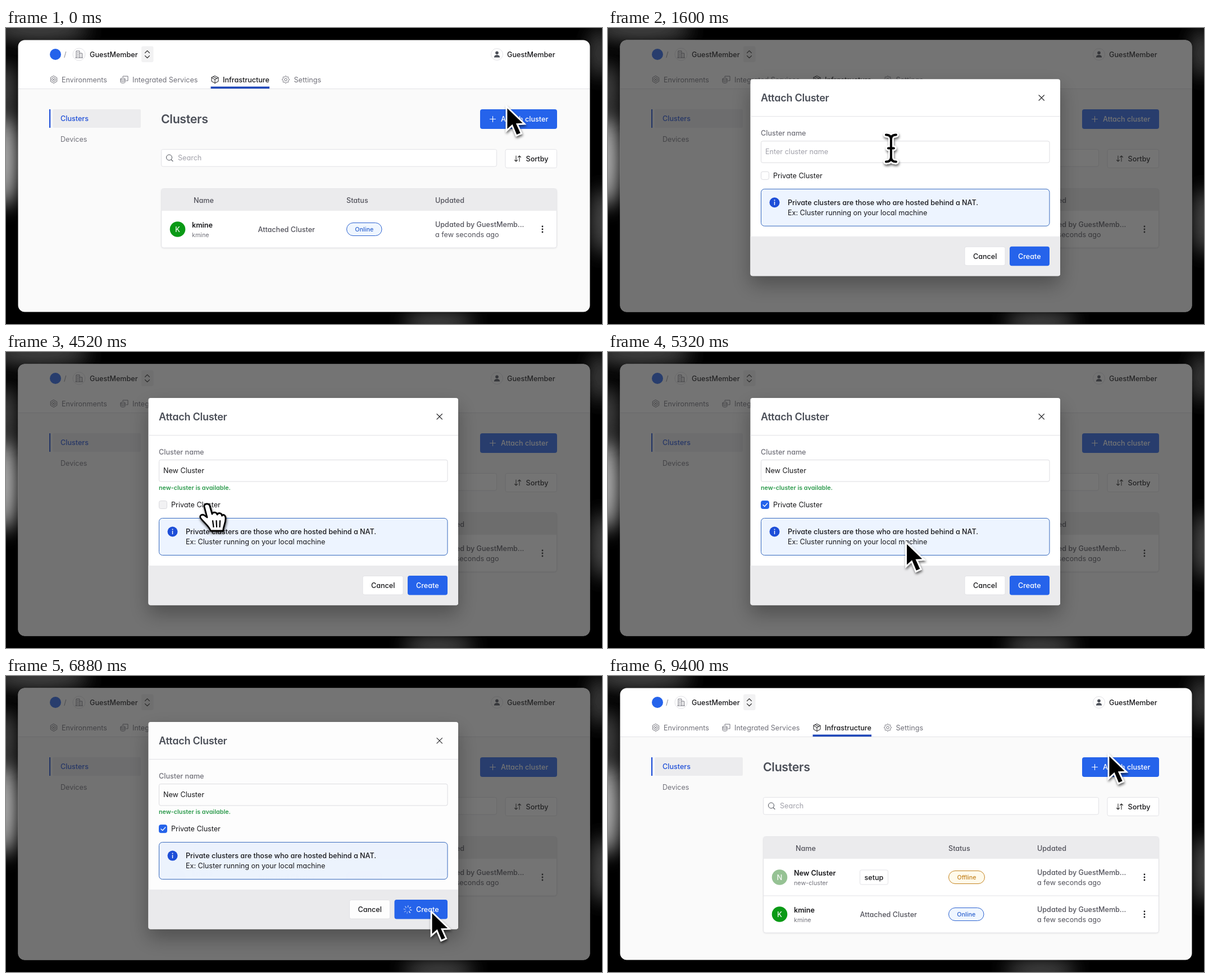
An HTML page that plays this animation: 1061x528 px, repeating every 9.44 s.

```html
<!DOCTYPE html>
<html lang="en">
<head>
<meta charset="utf-8">
<title>Attach cluster</title>
<style>
html, body { margin: 0; width: 100%; height: 100%; overflow: hidden; background: #000; }
svg { display: block; width: 1061px; height: 528px; }
text { font-family: Inter, "Noto Sans", sans-serif; font-feature-settings: "cv11"; font-optical-sizing: none; white-space: pre; }
</style>
</head>
<body>
<svg id="stage" viewBox="0 0 1061 528"></svg>
<script>
const LOOP = 9440;
const BLUE = '#2563eb', DEEP = '#1d4ed8', INK = '#18181b', GREY = '#52525b', SOFT = '#71717a', LINE = '#e2e2e6';
const ACCOUNT = 'GuestMember';

// Markup helpers; text is placed by its vertical centre.
const text = (x, cy, str, { size = 12.6, weight = 400, fill = INK, extra = '' } = {}) =>
  `<text x="${x}" y="${cy + size * 0.36}" font-size="${size}" font-weight="${weight}" fill="${fill}" ${extra}>${str}</text>`;
const rect = (x, y, w, h, r, fill, stroke = 'none', extra = '') =>
  `<rect x="${x}" y="${y}" width="${w}" height="${h}" rx="${r}" fill="${fill}" stroke="${stroke}" ${extra}/>`;
const circle = (x, y, r, fill, stroke = 'none', extra = '') =>
  `<circle cx="${x}" cy="${y}" r="${r}" fill="${fill}" stroke="${stroke}" ${extra}/>`;
const line = (d, stroke = INK, width = 1.1, extra = '') =>
  `<path d="${d}" fill="none" stroke="${stroke}" stroke-width="${width}" stroke-linecap="round" stroke-linejoin="round" ${extra}/>`;
const group = (id, body, extra = '') => `<g id="${id}" ${extra}>${body}</g>`;
const at = (x, y, body) => `<g transform="translate(${x} ${y})">${body}</g>`;
const heading = size => ({ size, weight: 600, fill: '#4b4f58', extra: 'letter-spacing="-0.015em"' });

const blob = (x, y, rx, ry, color) =>
  `<ellipse cx="${x}" cy="${y}" rx="${rx}" ry="${ry}" fill="${color}" filter="url(#haze)"/>`;

const hexagon = r => 'M' + [...Array(6)].map((_, i) =>
  `${(r * Math.sin(i * Math.PI / 3)).toFixed(2)} ${(-r * Math.cos(i * Math.PI / 3)).toFixed(2)}`).join('L') + 'Z';

const gear = 'M' + [...Array(48)].map((_, i) => {
  const a = i * Math.PI / 24, r = 5.7 + 0.9 * Math.cos(a * 8);
  return `${(r * Math.cos(a)).toFixed(2)} ${(r * Math.sin(a)).toFixed(2)}`;
}).join('L') + 'Z';

function header() {
  return rect(22, 22, 1017, 100, 12, '#fff') + rect(22, 108, 1017, 14, 0, '#fafafa') + rect(22, 108, 1017, 1, 0, LINE) +
    circle(88, 47, 10, BLUE) + text(103, 47, '/', { fill: '#8a8a92' }) +
    circle(130, 47, 11, '#fff', LINE) +
    line('M125 53V41h6v12M131 45h4.5v8M123.8 53h12.6M127 44h2M127 47h2M127 50h2M133 48v0M133 51v0', SOFT, 1) +
    text(149, 47, ACCOUNT, { weight: 500 }) +
    rect(241, 32.5, 21.5, 28.5, 3, '#f2f2f3') +
    line('M247.5 44.5l4-4 4 4M247.5 49.5l4 4 4-4', '#333') +
    circle(874, 47, 10.5, '#fff', LINE) + circle(874, 44.3, 2.8, '#4b4f58') +
    '<path d="M868.8 52.5a5.2 4.6 0 0 1 10.4 0z" fill="#4b4f58"/>' +
    text(892, 47, ACCOUNT, { weight: 500 }) +
    at(85, 92, line(hexagon(6.5), SOFT, 1) + line(hexagon(3.6), SOFT, 1) + circle(0, 0, 1.2, SOFT)) +
    text(99, 92, 'Environments', { fill: SOFT }) +
    at(210, 92, line('M-6-1v5.5c0 2.2 8 2.2 8 0V-1M-6-1a4 1.7 0 1 0 8 0a4 1.7 0 1 0-8 0M-6 2c0 2 8 2 8 0M-2-4.5V-6h9v8H4', SOFT, 1)) +
    text(225, 92, 'Integrated Services', { fill: SOFT }) +
    at(372, 92, line('M0-6.5L6-3.5V3L0 6.5L-6 3V-3.5ZM-6-3.5L0 0L6-3.5M0 0V6.5M-3-5L3-2', INK, 1)) +
    text(386, 92, 'Infrastructure', { weight: 500 }) +
    rect(364.5, 104.5, 104.5, 3.6, 0, '#1e46b8') +
    at(498, 92, line(gear, SOFT, 1) + circle(0, 0, 2.3, 'none', SOFT)) +
    text(512.5, 92, 'Settings', { fill: SOFT });
}

const badge = (w, label, fill, stroke) =>
  rect(606.5, -11.5, w, 23, 11.5, fill, stroke) +
  text(606.5 + w / 2, 0, label, { size: 10.75, weight: 500, fill: stroke, extra: 'text-anchor="middle"' });

function row({ letter, color, name, slug, kind, status }) {
  return circle(305.5, 0, 13.8, color) +
    text(305.5, 0, letter, { size: 13, weight: 500, fill: '#fff', extra: 'text-anchor="middle" opacity=".9"' }) +
    text(331, -8, name, { weight: 600 }) + text(331, 10, slug, { size: 10.75, fill: SOFT }) +
    kind + status +
    text(764, -9, `Updated by ${ACCOUNT.slice(0, 9)}...`, { weight: 500, fill: GREY }) +
    text(764, 9, 'a few seconds ago', { fill: GREY }) +
    [-5, 0, 5].map(y => circle(955, y, 1.4, INK)).join('');
}

function content() {
  const th = { weight: 500, fill: GREY };
  return rect(77, 145, 2.2, 33, 0, DEEP) + rect(83, 145, 157, 33, 2, '#ececee') +
    text(97, 161.5, 'Clusters', { weight: 500, fill: DEEP }) + text(97, 198, 'Devices', { fill: SOFT }) +
    text(276, 162.5, 'Clusters', heading(21.3)) +
    rect(844, 145, 137, 35, 4, BLUE) + line('M861.5 162.5h10M866.5 157.5v10', '#fff') +
    text(881, 162.5, 'Attach cluster', { weight: 500, fill: '#fff' }) +
    rect(276.5, 216.5, 597, 30.5, 3, '#fff', LINE) +
    circle(290.5, 231, 5, 'none', '#4b4f58') + line('M294.2 234.8l2.8 2.8', '#4b4f58') +
    text(306, 231.5, 'Search', { fill: '#a1a1aa' }) +
    rect(889, 216.5, 91.5, 33, 3, '#fff', LINE) +
    line('M908 228v10M905.5 235.5l2.5 2.5 2.5-2.5M914 238v-10M911.5 230.5l2.5-2.5 2.5 2.5', '#333') +
    text(925.5, 233, 'Sortby', { weight: 500 }) +
    rect(276.5, 286.5, 704, 105.5, 4, '#fff', LINE, 'id="table" filter="url(#lift)"') +
    '<path d="M276.5 326V290.5a4 4 0 0 1 4-4H976.5a4 4 0 0 1 4 4V326z" fill="#ebebed"/>' +
    text(334, 307, 'Name', th) + text(606, 307, 'Status', th) + text(764, 307, 'Updated', th) +
    group('newRow', at(0, 359, row({
      letter: 'N', color: '#96c294', name: 'New Cluster', slug: 'new-cluster',
      kind: rect(448.5, -13, 50, 26, 3, '#fff', LINE) + text(456.5, 0, 'setup', { weight: 500 }),
      status: badge(64, 'Offline', '#fffaeb', '#c4831f')
    })) + rect(277, 391.5, 703, 1, 0, LINE)) +
    group('oldRow', row({
      letter: 'K', color: '#0a9a16', name: 'kmine', slug: 'kmine',
      kind: text(448.5, 0, 'Attached Cluster', { weight: 500, fill: GREY }),
      status: badge(62.5, 'Online', '#eff6ff', '#2c62cf')
    })) +
    group('busy', circle(0, 0, 6.5, '#fff', '#ecd9c0') +
      line('M0-6.5A6.5 6.5 0 1 1-6.5 0', '#c58a45', 1.2) + circle(0, 0, 2.2, '#c58a45'));
}

function modal() {
  const rays = [...Array(8)].map((_, i) =>
    line('M0-4.2V-7', '#fff', 1.3, `transform="rotate(${i * 45})" opacity="${0.4 + i * 0.08}"`)).join('');
  const lower = rect(272.5, 165, 14, 14, 3, '#fff', '#d9d9de', 'id="box"') +
    line('M276 172.3l2.7 2.7 5-5.6', '#fff', 1.4, 'id="tick"') +
    text(294, 172, 'Private Cluster') +
    rect(272.5, 196, 513.5, 66, 6, '#edf4ff', '#3468bd') +
    circle(296.5, 220, 9, DEEP) + line('M296.5 219v5', '#fff', 1.4) + circle(296.5, 216, 1, '#fff') +
    text(320, 220, 'Private clusters are those who are hosted behind a NAT.', { weight: 500 }) +
    text(320, 238, 'Ex: Cluster running on your local machine') +
    '<path d="M253.5 280.5H805V347a4 4 0 0 1-4 4H257.5a4 4 0 0 1-4-4z" fill="#ebebed"/>' +
    group('cancel', rect(635, 299, 72, 33.5, 3, '#fff', LINE) + text(650, 316, 'Cancel', { weight: 500 })) +
    rect(715, 298.5, 71, 34.5, 4, BLUE, 'none', 'id="create"') +
    text(730, 316, 'Create', { weight: 500, fill: '#fff' }) +
    at(715, 316, group('rays', rays));
  return rect(253.5, 0, 551.5, 351, 4, '#fff', 'none', 'id="sheet" filter="url(#drop)"') +
    rect(253.5, 66, 551.5, 1, 0, LINE) + text(272, 33.5, 'Attach Cluster', heading(18)) +
    line('M767 28.5l9.5 9.5M776.5 28.5l-9.5 9.5', '#27272a') +
    text(272, 96, 'Cluster name', { weight: 500, fill: SOFT }) +
    rect(272.5, 110.5, 513.5, 38.5, 3, '#fff', '#dcdce0') +
    rect(271.4, 109.4, 515.7, 40.7, 4, 'none', '#8db4f8', 'id="ring" stroke-width="2.6"') +
    text(280, 129.5, 'Enter cluster name', { fill: '#a1a1aa', extra: 'id="hint"' }) +
    text(280, 129.5, '', { extra: 'id="typed"' }) +
    rect(0, 122.5, 1, 14, 0, INK, 'none', 'id="caret"') +
    group('checking', at(276.8, 160, line('M0-4.2A4.2 4.2 0 1 1-3.4 2.5', '#555', 1, 'id="wheel"')) +
      text(285, 160, 'Checking availability', { size: 10.8 })) +
    text(272, 160, 'new-cluster is available.', { size: 10.75, weight: 600, fill: '#2b9a4b', extra: 'id="available"' }) +
    group('lower', lower);
}

function cursors() {
  const beam = 'M-9-24q9 0 9 8V16q0 8-9 8M9-24q-9 0-9 8M0 16q0 8 9 8M-5 0H5';
  const arrow = '<path d="M1 2V45L11 36L18.5 54L27.5 50L20 33.5L33 33Z" fill="#000" stroke="#fff" stroke-width="2.8"/>';
  const hand = '<path d="M-5 4C-6-2 3-3 5 3L9 17C10 13 17 13 18 18C20 14 26 15 26.5 20C29 17 33 19 33 25C33 34 29 38 28.5 47H6C5 40-4 34-11 25C-15 20-9 16-4 20L0 23Z" fill="#fff" stroke="#000" stroke-width="2.8" stroke-linejoin="round"/>' +
    line('M10 29l1.5 11M16.5 29l.5 11M23 29l-.5 11', '#000', 2.2);
  const ibeam = line(beam, '#fff', 9.5) + line(beam, '#000', 4);
  return group('pointer', group('arrow', arrow) + group('hand', hand) + group('ibeam', ibeam), 'filter="url(#cast)"');
}

const stage = document.getElementById('stage');
stage.innerHTML = `<defs>
  <filter id="haze" x="-100%" y="-200%" width="300%" height="500%"><feGaussianBlur stdDeviation="16"/></filter>
  <filter id="lift" x="-5%" y="-5%" width="110%" height="115%"><feDropShadow dx="0" dy="1" stdDeviation="1" flood-opacity=".08"/></filter>
  <filter id="drop" x="-20%" y="-20%" width="140%" height="150%"><feDropShadow dx="0" dy="16" stdDeviation="17" flood-opacity=".3"/></filter>
  <filter id="cast" x="-50%" y="-50%" width="220%" height="220%"><feDropShadow dx="1" dy="3" stdDeviation="2.2" flood-opacity=".6"/></filter>
</defs>` +
  rect(0, 0, 1061, 528, 0, '#000') +
  blob(-2, 235, 20, 85, '#c4c4c4') + blob(0, 110, 14, 50, '#5a5a5a') + blob(60, 2, 90, 20, '#4a4a4a') +
  blob(1061, 345, 16, 60, '#5c5c5c') + blob(1056, 45, 16, 45, '#484848') + blob(770, 524, 65, 12, '#666') +
  rect(21.5, 21.5, 1018, 485, 12, '#fafafa') + header() + content() +
  rect(21.5, 21.5, 1018, 485, 12, '#2a2a2a', 'none', 'id="shade"') +
  group('modal', modal()) + cursors();

const el = {};
stage.querySelectorAll('[id]').forEach(node => el[node.id] = node);
const set = (id, attrs) => { for (const key in attrs) el[id].setAttribute(key, attrs[key]); };
const show = (id, on) => set(id, { visibility: on ? 'inherit' : 'hidden' });

const clamp = v => Math.min(1, Math.max(0, v));
const ramp = (t, from, to) => clamp((t - from) / (to - from));
const ease = p => p * p * (3 - 2 * p);

// Pointer stops: time, x, y
const STOPS = [
  [0, 890, 138], [100, 890, 138], [450, 912, 155], [1050, 912, 155], [1800, 418, 227],
  [3850, 418, 227], [4400, 358, 272], [4950, 358, 272], [5750, 743, 419], [6600, 743, 419],
  [7200, 772, 417], [8250, 772, 417], [9100, 890, 138], [LOOP, 890, 138]
];
function pointerAt(t) {
  const i = STOPS.findIndex(stop => stop[0] > t);
  const [t0, x0, y0] = STOPS[i - 1], [t1, x1, y1] = STOPS[i];
  const p = ease(ramp(t, t0, t1));
  return [x0 + (x1 - x0) * p, y0 + (y1 - y0) * p];
}
function pointerShape(t, x, y, loading) {
  const inside = (l, top, r, b) => x >= l && x <= r && y >= top && y <= b;
  if (t < 1050 || t > 7000) return inside(844, 145, 981, 180) ? 'hand' : 'arrow';
  if (inside(272, 192, 786, 240)) return 'ibeam';
  if (inside(272, 264, 382, 281) || (!loading && inside(715, 399, 786, 433))) return 'hand';
  return 'arrow';
}

function render(t) {
  const opened = ramp(t, 560, 700) * (1 - ramp(t, 6880, 7040));
  const helper = t >= 2200, loading = t >= 6120, checked = t >= 4600, added = t >= 8120;
  const extra = helper ? 18.5 : 0;

  set('shade', { opacity: 0.65 * ramp(t, 520, 650) * (1 - ramp(t, 6900, 7060)) });
  show('modal', opened > 0);
  set('modal', { opacity: opened, transform: `translate(0 ${91.25 - extra / 2 + 16 * (1 - opened)})` });
  set('sheet', { height: 351 + extra });
  set('lower', { transform: `translate(0 ${extra})` });

  const count = Math.max(0, Math.floor((t - 2150) / 140) + 1);
  const focused = t >= 1920 && t < 4480;
  const typing = count > 0 && count <= 11;
  el.typed.textContent = 'New Cluster'.slice(0, count);
  show('hint', count === 0);
  show('ring', focused);
  show('caret', focused && (typing || t % 1000 < 500));
  set('caret', { x: 280 + (count ? el.typed.getComputedTextLength() : 0) + 0.5 });
  show('checking', helper && t < 3850);
  show('available', t >= 3850);
  set('wheel', { transform: `rotate(${(t - 2680) * 0.36})` });

  const hover = t > 4300 && !checked;
  set('box', { fill: checked ? BLUE : hover ? '#f1f1f3' : '#fff', stroke: checked ? BLUE : '#d9d9de' });
  show('tick', checked);
  set('create', loading ? { x: 691.5, width: 94.5 } : { x: 715, width: 71 });
  set('cancel', { transform: `translate(${loading ? -23.5 : 0} 0)` });
  show('rays', loading);
  set('rays', { transform: `rotate(${(t - 6360) * 0.36})` });

  show('newRow', added);
  set('oldRow', { transform: `translate(0 ${added ? 425 : 359})` });
  set('table', { height: added ? 171.5 : 105.5 });
  show('busy', t >= 7400 && t < 8120);
  set('busy', { transform: `translate(1024 498) rotate(${(t - 7680) * 0.36})` });

  const [x, y] = pointerAt(t);
  const shape = pointerShape(t, x, y, loading);
  set('pointer', { transform: `translate(${x} ${y})` });
  ['arrow', 'hand', 'ibeam'].forEach(id => show(id, id === shape));
}

const start = performance.now();
function tick() {
  render((performance.now() - start) % LOOP);
  requestAnimationFrame(tick);
}
tick();
</script>
</body>
</html>
```
